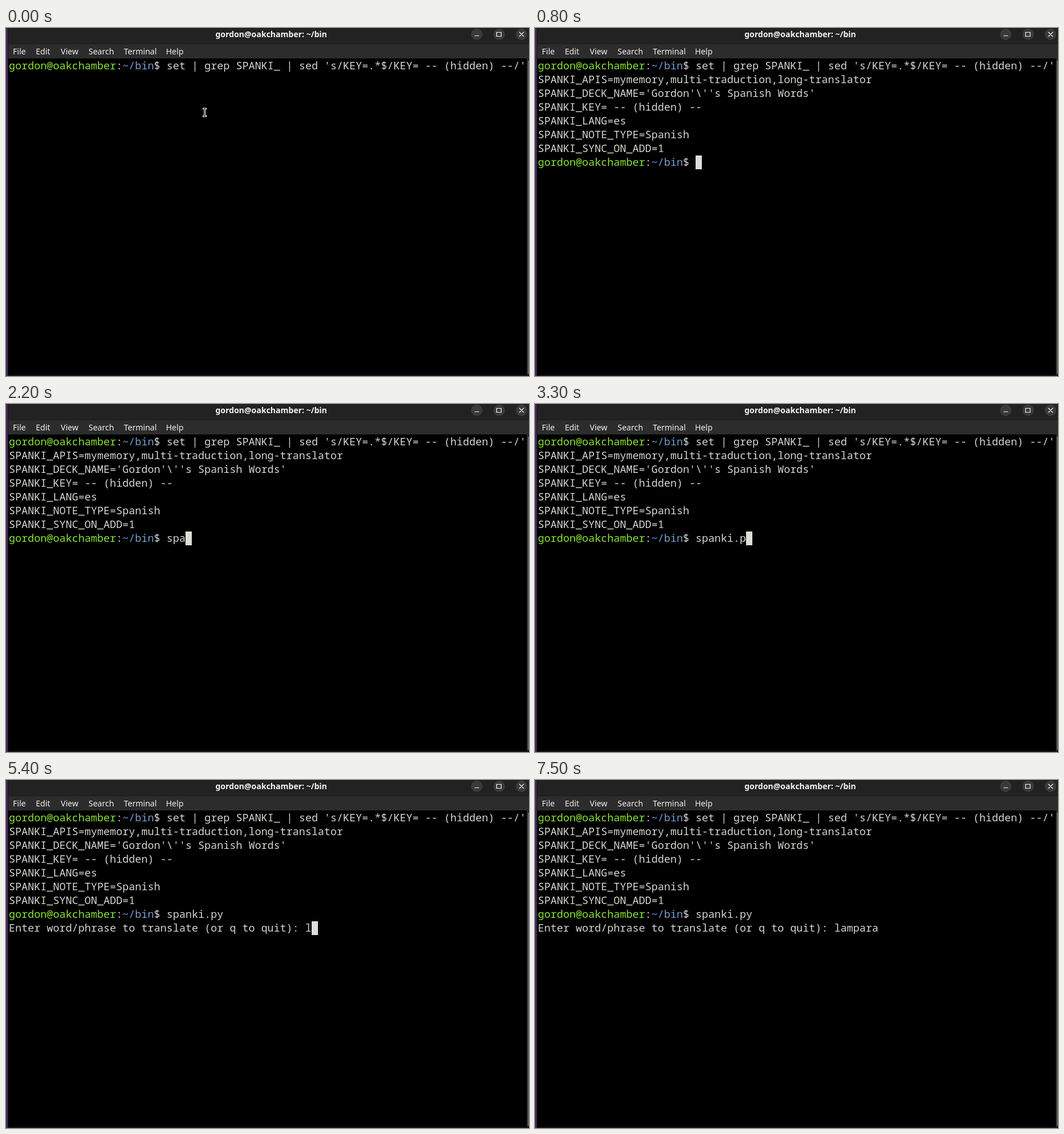
Animation of 912 by 606 pixels, one loop 8 s. Source, as an HTML page:

```html
<!DOCTYPE html>
<html lang="en">
<head>
<meta charset="utf-8">
<title>Terminal</title>
<style>
html, body { margin: 0; width: 100%; height: 100%; overflow: hidden; background: #000; }
body { position: relative; }
svg, pre, #cursor { position: absolute; }
svg { left: 0; top: 0; font: 14px "Noto Sans", "Open Sans", sans-serif; }
pre { left: 5px; top: 53px; margin: 0; color: #d3d7cf; font: 18.333px/24px "Noto Sans Mono", monospace; }
#cursor { width: 11px; height: 24px; background: #dcdfd8; }
.user { color: #8ae234; }
.path { color: #729fcf; }
</style>
</head>
<body>
<svg width="912" height="606" viewBox="0 0 912 606">
  <rect width="912" height="28" fill="#222"/>
  <rect y="28" width="912" height="25" fill="#2c2c2c"/>
  <rect y="27" width="912" height="1" fill="#1a1a1a"/>
  <rect x="908" y="53" width="4" height="553" fill="#262626"/>
  <rect x="910" y="57" width="1.5" height="545" fill="#777"/>
  <rect y="604" width="912" height="2" fill="#1a1220"/>
  <rect width="3" height="606" fill="#47265c"/>
  <rect x="3" width="1" height="606" fill="#1c1420"/>
  <text x="462.5" y="16" fill="#f4f4f4" font-weight="700" text-anchor="middle">gordon@oakchamber: ~/bin</text>
  <g fill="#f0f0f0">
    <text x="12" y="46">File</text>
    <text x="52" y="46">Edit</text>
    <text x="95.5" y="46">View</text>
    <text x="144" y="46">Search</text>
    <text x="205.5" y="46">Terminal</text>
    <text x="279" y="46">Help</text>
  </g>
  <g fill="#3a3a3a">
    <circle cx="821" cy="11" r="10"/>
    <circle cx="860" cy="11" r="10"/>
    <circle cx="899" cy="11" r="10"/>
  </g>
  <path d="M817 13.5h8M855.5 7.5h8v7h-8zM895 7l8 8m0-8l-8 8" fill="none" stroke="#f4f4f4" stroke-width="1.2"/>
  <g id="pointer" fill="none" stroke-linecap="square">
    <path d="M344.5 140.5h4M346.5 140.5v13M344.5 153.5h4" stroke="#fff" stroke-width="3"/>
    <path d="M344.5 140.5h4M346.5 140.5v13M344.5 153.5h4" stroke="#000"/>
  </g>
</svg>
<div id="cursor"></div>
<pre id="screen"></pre>
<script>
const $ = id => document.getElementById(id);
const prompt = 'gordon@oakchamber:~/bin$ ';
const coloured = '<span class="user">gordon@oakchamber</span>:<span class="path">~/bin</span>$ ';
const first = prompt + "set | grep SPANKI_ | sed 's/KEY=.*$/KEY= -- (hidden) --/'\n";
const ready = first + [
  'SPANKI_APIS=mymemory,multi-traduction,long-translator',
  "SPANKI_DECK_NAME='Gordon'\\''s Spanish Words'",
  'SPANKI_KEY= -- (hidden) --',
  'SPANKI_LANG=es',
  'SPANKI_NOTE_TYPE=Spanish',
  'SPANKI_SYNC_ON_ADD=1',
  prompt
].join('\n');
const run = ready + 'spanki.py\n';
const ask = run + 'Enter word/phrase to translate (or q to quit): ';

// [start in ms, screen text, cursor shown]
const steps = [
  [0, first, false], [100, first, true],
  [800, ready, true], [1400, ready, false], [1800, ready, true],
  [1900, ready + 's', true], [2000, ready + 'sp', true],
  [2200, ready + 'spa', true], [2300, ready + 'span', true], [2400, ready + 'spank', true],
  [3300, ready + 'spanki.p', true], [3500, ready + 'spanki.py', true],
  [3700, run, true], [4500, ask, false], [5200, ask, true],
  [5400, ask + 'l', true], [5700, ask + 'lam', true], [5900, ask + 'lamp', true],
  [6200, ask + 'lampar', true], [6500, ask + 'lampara', true],
  [7100, ask + 'lampara\n', true], [7500, ask + 'lampara\n', false]
];

let shown;
function show(step) {
  if (step === shown) return;
  shown = step;
  const [start, text, cursorOn] = step;
  const lines = text.split('\n');
  $('screen').innerHTML = text.replaceAll(prompt, () => coloured);
  $('cursor').style.left = 5 + 11 * lines.at(-1).length + 'px';
  $('cursor').style.top = 30 + 24 * lines.length + 'px';
  $('cursor').style.visibility = cursorOn ? 'visible' : 'hidden';
  $('pointer').style.visibility = start < 800 ? 'visible' : 'hidden';
}

function frame() {
  const t = performance.now() % 8000;
  show(steps.findLast(([start]) => start <= t));
  requestAnimationFrame(frame);
}
frame();
</script>
</body>
</html>
```
